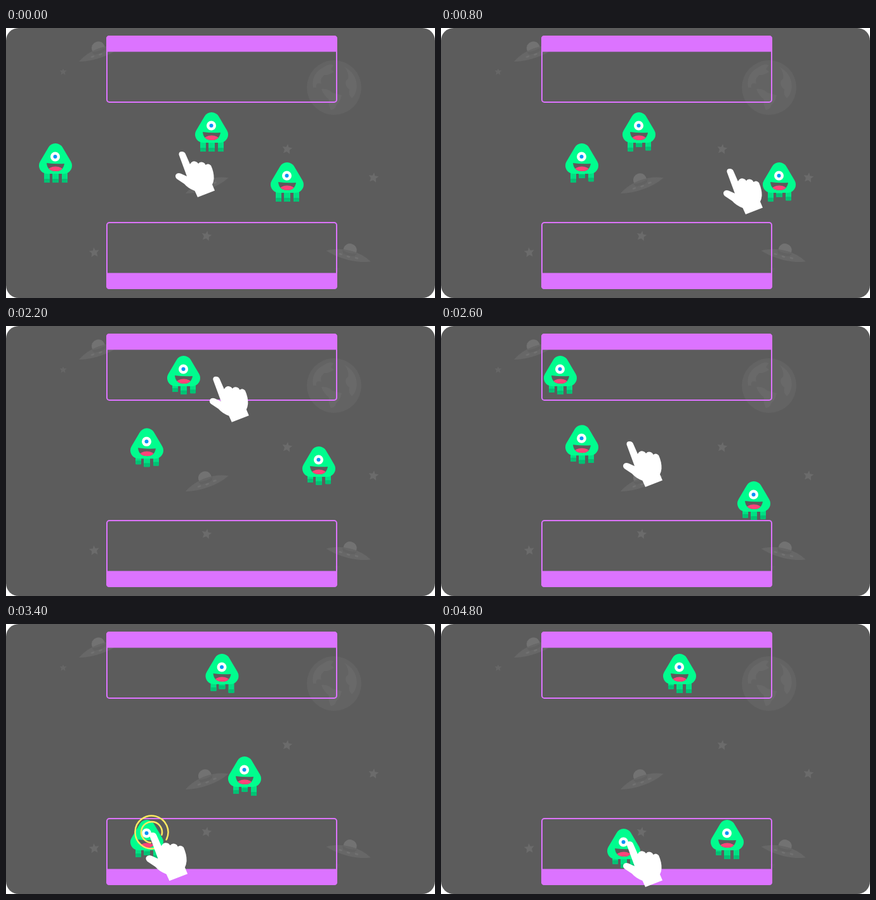
An HTML page that plays this animation: 676x426 px, repeating every 5000 ms.

```html
<!DOCTYPE html>
<html lang="en">
<head>
<meta charset="utf-8">
<title>Catch the aliens</title>
<style>
html, body { margin: 0; width: 100%; height: 100%; overflow: hidden; background: #fff; }
svg { display: block; width: 676px; height: 426px; }
</style>
</head>
<body>
<svg viewBox="0 0 676 426" xmlns="http://www.w3.org/2000/svg">
  <defs>
    <clipPath id="mouth"><path id="lips" d="M12 31Q26 33 40 32Q38 44 27 44Q13 44 12 31Z"/></clipPath>
    <path id="star" d="M0-8L2-3L8-3L4 1L5 7L0 4L-5 7L-4 1L-8-3L-2-3Z" fill="#6b6b6b"/>
    <g id="ufo">
      <ellipse cy="-5" rx="10.5" ry="10" fill="#727272"/>
      <path d="M-36 5Q-20-4 0-4Q20-4 36 5Q20 11 0 11Q-20 11-36 5Z" fill="#676767"/>
      <path d="M-12-2Q0 2 12-2L9 3Q0 5-9 3Z" fill="#626262"/>
      <g fill="#717171">
        <ellipse cx="-13" cy="5" rx="3" ry="1.5"/>
        <ellipse cy="6" rx="3" ry="1.5"/>
        <ellipse cx="13" cy="5" rx="3" ry="1.5"/>
      </g>
    </g>
    <g id="box">
      <rect x="159" y="13" width="362" height="104" rx="4" fill="none" stroke="#dc73ff" stroke-width="2"/>
      <path d="M158 37.5V17Q158 12 163 12H517Q522 12 522 17V37.5Z" fill="#dc73ff"/>
    </g>
  </defs>

  <rect width="676" height="426" rx="20" fill="#5c5c5c"/>
  <circle cx="517" cy="94" r="43" fill="#636363"/>
  <g fill="#696969">
    <path d="M484 94Q480 73 500 62Q511 55 516 59L512 65L517 69Q509 75 502 74Q494 80 497 88Q487 85 489 94Z"/>
    <path d="M497 96Q508 95 514 102L529 106Q527 116 521 121Q518 130 512 129Q507 120 509 113Q500 106 497 96Z"/>
    <path d="M534 62Q548 69 552 84Q555 101 545 111Q539 106 541 97Q533 91 536 83Q544 78 534 62Z"/>
  </g>
  <use href="#ufo" transform="translate(147 36) rotate(-20)"/>
  <use href="#ufo" transform="translate(315 244) rotate(-20)"/>
  <use href="#ufo" transform="translate(541 355) rotate(14)"/>
  <use href="#star" transform="translate(90 69) scale(.7)" opacity=".7"/>
  <use href="#star" transform="translate(443 191) rotate(8)"/>
  <use href="#star" transform="translate(579 236) rotate(8)"/>
  <use href="#star" transform="translate(139 354) rotate(-5)"/>
  <use href="#star" transform="translate(316 328) rotate(10)"/>
  <use href="#star" transform="translate(522 381) scale(.6)" opacity=".3"/>
  <use href="#box"/>
  <use href="#box" transform="translate(0 424) scale(1 -1)"/>
  <g id="aliens"></g>
  <g id="ring" fill="none" stroke="#ffeb62" stroke-width="2.5" stroke-linecap="round"></g>
  <path id="hand" fill="#fff" d="M5.5 5Q5 0 10 0Q14.500 0 16 4L23 20Q26 14.500 31 15.500Q34.500 16 36 19Q39 15.500 43.500 17Q46.500 18 47.500 21Q52 17.500 56 22Q61 33 60.500 43Q60 48 58 52L62 61.500L35 72L30.500 62Q20 58 14 51L2 43Q-1 40 0.500 36.500Q3 33 8 34.500L18 39Z"/>
</svg>
<script>
const STEP = 200, COUNT = 25;
const LEG_RATES = [3.04, 2.36, 1.84];   // radians per step
const el = id => document.getElementById(id);

// Corners of each walk: [step, x, y].
const walks = {
  a: [[0, 52, 182], [4, 196, 182], [6, 196, 118], [9, 196, 248], [12, 196, 118],
      [17, 196, 309], [18, 196, 309], [24, 425, 309]],
  b: [[0, 298, 133], [2, 226, 133], [4, 286, 133], [9, 467, 135], [13, 467, 245],
      [14, 467, 209], [20, 233, 209], [21, 263, 209], [23, 262, 323]],
  c: [[0, 417, 212], [3, 552, 212], [5, 462, 212], [8, 374, 97], [9, 300, 47],
      [10, 300, 47], [13, 162, 47], [21, 467, 47], [24, 350, 47]]
};
const grips = [
  { who: 'c', press: 5, free: 10 },
  { who: 'a', press: 15, free: 18 },
  { who: 'b', press: 21, free: 24 }
];

const linear = k => k, easeIn = k => k * k;

function at(path, n, ease = linear) {
  const i = path.findIndex(p => p[0] >= n);
  if (i < 0) return path.at(-1).slice(1);
  if (i === 0) return path[0].slice(1);
  const [s, x, y] = path[i - 1], [e, u, v] = path[i];
  const k = ease((n - s) / (e - s));
  return [x + (u - x) * k, y + (v - y) * k];
}

// Where the fingertip rests on an alien.
function touch(who, n) {
  const [x, y] = at(walks[who], n);
  return [x + 35, y + 20];
}

const handPath = [[0, 277, 195], [3, 455, 222], [4, 455, 222], [13, 297, 182]]
  .concat(grips.flatMap(g => [g.press, g.free].map(n => [n, ...touch(g.who, n)])))
  .sort((p, q) => p[0] - q[0]);

const leg = (x, w) => `<g class="leg"><rect x="${x}" y="34" width="${w}" height="28" rx="1.5" fill="#00e184"/>
  <rect x="${x}" y="56" width="${w}" height="6" rx="1" fill="#00c274"/></g>`;

const alien = id => `<g id="${id}">${leg(8, 9)}${leg(21, 10)}${leg(36, 9)}
  <path d="M26 13L13 35L39 35Z" fill="#00fd8e" stroke="#00fd8e" stroke-width="26" stroke-linejoin="round"/>
  <circle cx="25.5" cy="21" r="7.5" fill="#fff"/><circle cx="25.5" cy="21" r="3" fill="#0a95f5"/>
  <use href="#lips" fill="#5c5c5c"/>
  <ellipse cx="26" cy="43" rx="12" ry="6.5" fill="#ff4379" clip-path="url(#mouth)"/></g>`;

function arc(r, from, to) {
  const p = a => [r * Math.cos(a * Math.PI / 180), r * Math.sin(a * Math.PI / 180)];
  return `<path d="M${p(from)}A${r} ${r} 0 1 1 ${p(to)}"/>`;
}

el('aliens').innerHTML = Object.keys(walks).map(alien).join('');
el('ring').innerHTML = arc(26, 80, 387) + arc(16.5, 95, 375);

const move = (node, [x, y], more = '') => node.setAttribute('transform', `translate(${x} ${y})${more}`);

function draw(n) {
  for (const id in walks) {
    move(el(id), at(walks[id], n));
    el(id).querySelectorAll('.leg').forEach((g, i) =>
      move(g, [0, 3.5 * (Math.cos(LEG_RATES[i] * n) - 1)]));
  }
  const grip = grips.find(g => n >= g.press && n < g.free);
  const tip = grip ? touch(grip.who, n) : at(handPath, n, easeIn);
  move(el('hand'), tip, ` scale(${grip ? 1.06 : 1}) translate(-10 0)`);
  move(el('ring'), [tip[0] - 1.5, tip[1] - 0.5]);
  el('ring').style.display = grip ? '' : 'none';
}

const start = performance.now();
let shown = 0;
function tick(now) {
  const n = Math.floor(Math.max(0, now - start) / STEP) % COUNT;
  if (n !== shown) draw(shown = n);
  requestAnimationFrame(tick);
}
draw(shown);
requestAnimationFrame(tick);
</script>
</body>
</html>
```
